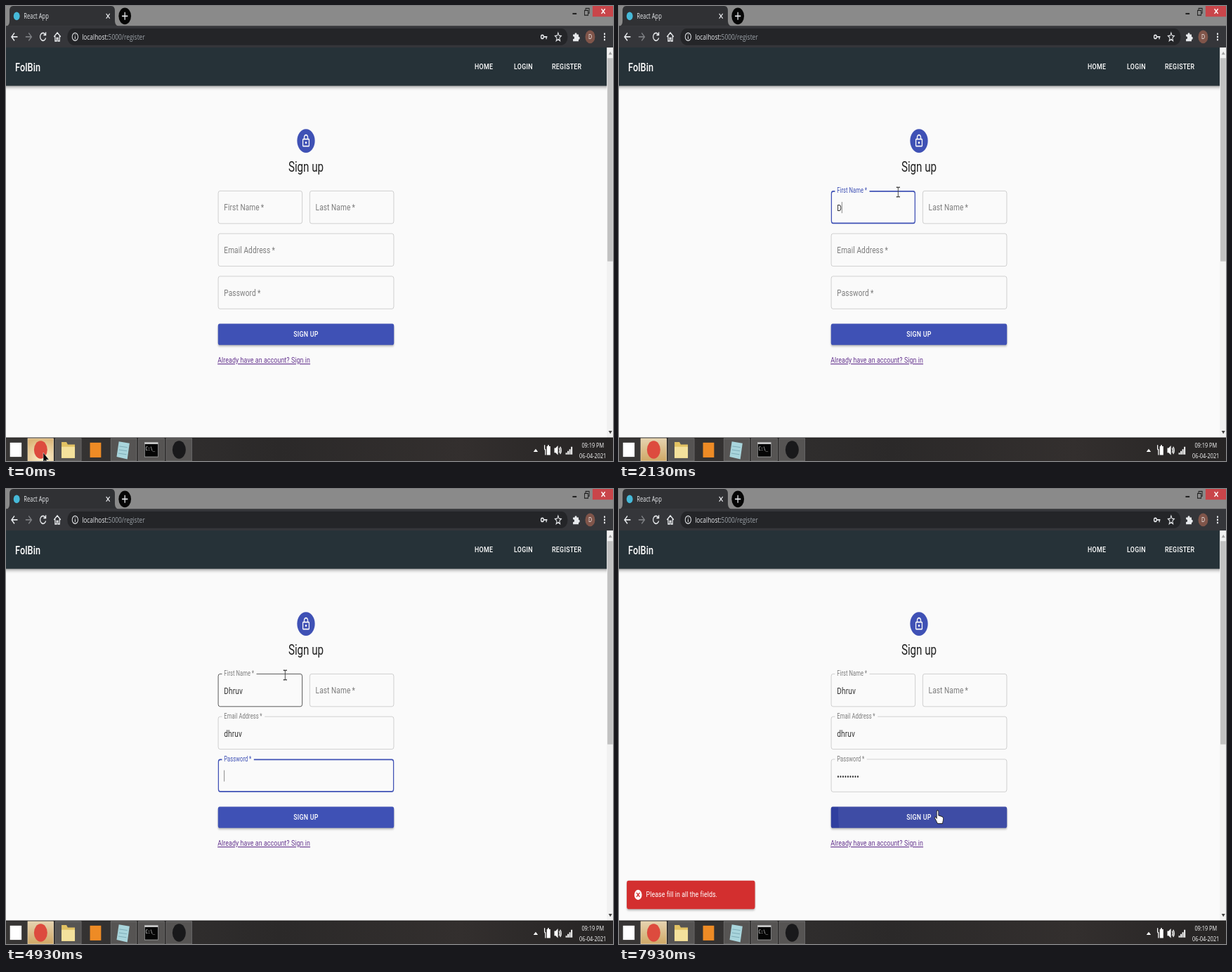
Write an HTML page that moves like this. It is 864x648 px and loops after 8000 ms.

```html
<!DOCTYPE html>
<html lang="en">
<head>
<meta charset="utf-8">
<title>Sign up</title>
<style>
  html, body { margin: 0; width: 100%; height: 100%; overflow: hidden; background: #fafafa; }
  svg { display: block; width: 864px; height: 648px; }
  text { font: 400 14px Roboto, sans-serif; white-space: pre; }
  .ui { font-family: "Open Sans", sans-serif; }
  .medium { font-weight: 500; letter-spacing: .4px; fill: #fff; }
  .value { font-size: 16px; letter-spacing: .15px; fill: rgba(0,0,0,.8); }
  .label { font-size: 16px; letter-spacing: .15px; }
  .line { fill: none; stroke: #e8eaed; stroke-width: 2; }
  .nav { filter: drop-shadow(0 2px 3px rgba(0,0,0,.42)); }
  .raised { filter: drop-shadow(0 2px 2px rgba(0,0,0,.3)); }
</style>
</head>
<body>
<!-- A 1366 x 768 desktop squeezed into a 4:3 stage -->
<svg viewBox="0 0 1366 768" preserveAspectRatio="none">
  <defs>
    <linearGradient id="bar" x2="1" y2="0">
      <stop stop-color="#383635"/><stop offset=".45" stop-color="#2b2929"/>
      <stop offset=".75" stop-color="#332f2e"/><stop offset="1" stop-color="#262424"/>
    </linearGradient>
    <linearGradient id="active" x2="0" y2="1">
      <stop stop-color="#e6d3b0"/><stop offset="1" stop-color="#cfa866"/>
    </linearGradient>
    <radialGradient id="glow" cx=".6" cy=".9" r=".9">
      <stop stop-color="#fff3d0"/><stop offset="1" stop-color="#dcb679"/>
    </radialGradient>
    <clipPath id="buttonClip"><rect x="476.5" y="535.5" width="396" height="36" rx="4"/></clipPath>
  </defs>

  <rect width="1366" height="768" fill="#fafafa"/>

  <!-- page -->
  <g transform="translate(.6 .7)">
    <rect class="nav" x="-10" y="69" width="1372" height="65" fill="#263238"/>
    <text class="medium" x="20" y="109.5" style="font-size:20px;letter-spacing:.15px">FolBin</text>
    <text class="medium" x="1054" y="106.5">HOME</text>
    <text class="medium" x="1142.5" y="106.5">LOGIN</text>
    <text class="medium" x="1228" y="106.5">REGISTER</text>

    <circle cx="674.5" cy="227" r="20" fill="#3f51b5"/>
    <g transform="translate(662.5 215)" fill="none" stroke="#fafafa" stroke-width="2">
      <rect x="5" y="9" width="14" height="12" rx="1"/>
      <path d="M8 9V6a4 4 0 0 1 8 0V9"/>
      <circle cx="12" cy="15" r="2" fill="#fafafa" stroke="none"/>
    </g>
    <text x="674.5" y="279.5" text-anchor="middle" style="font-size:24px" fill="#212121">Sign up</text>

    <g id="fields"></g>

    <rect id="button" class="raised" x="476.5" y="535.5" width="396" height="36" rx="4"/>
    <circle id="ripple" fill="#fff" clip-path="url(#buttonClip)"/>
    <text class="medium" x="674.5" y="558" text-anchor="middle">SIGN UP</text>
    <text x="475.5" y="601.5" fill="#65358f" letter-spacing=".15" text-decoration="underline">Already have an account? Sign in</text>
  </g>

  <g id="toast">
    <rect class="raised" x="17.5" y="661" width="288.5" height="48" rx="4" fill="#d32f2f"/>
    <circle cx="43" cy="685" r="8.5" fill="#fff"/>
    <path d="M39.5 681.5l7 7m0-7l-7 7" stroke="#d32f2f" stroke-width="2"/>
    <text x="61" y="689" fill="#fff" letter-spacing=".1">Please fill in all the fields.</text>
  </g>

  <!-- scrollbar -->
  <rect x="1352" y="70" width="14" height="659" fill="#f1f1f1"/>
  <rect x="1353.5" y="88" width="12" height="343" fill="#c1c1c1"/>
  <path d="M1356 82l4-5 4 5z" fill="#a0a0a0"/>
  <path d="M1356 717l4 5 4-5z" fill="#404040"/>

  <!-- browser frame -->
  <rect width="1366" height="35" fill="#8a8a8a"/>
  <path d="M0 34C6 34 8 30 8 24V8Q8 0 16 0H237Q245 0 245 8V24C245 30 248 34 254 34z" fill="#303134"/>
  <rect y="33.5" width="1366" height="36.5" fill="#35363a"/>
  <circle cx="24" cy="17" r="7" fill="#46b9d8"/>
  <text class="ui" x="40" y="21" style="font-size:12px" fill="#e8eaed">React App</text>
  <path class="line" d="M225.5 13l8 8m0-8l-8 8" style="stroke-width:1.7"/>
  <circle cx="267.5" cy="17" r="14" fill="#060606"/>
  <path class="line" d="M261 17h13m-6.5-6.5v13"/>
  <path d="M1275 13h9" stroke="#222" stroke-width="2.5"/>
  <path d="M1302 7.5h8v8h-8zM1304.5 7v-3h8v8h-3" fill="none" stroke="#222" stroke-width="1.5"/>
  <rect x="1320" width="46" height="18" fill="#c9454a"/>
  <path d="M1340 5l8 8m0-8l-8 8" stroke="#fff" stroke-width="2"/>

  <rect x="138" y="38" width="1126" height="28" rx="14" fill="#242528"/>
  <path class="line" d="M26 52H13m6-6.5l-6.5 6.5 6.5 6.5"/>
  <path class="line" d="M44 52h13m-6-6.5l6.5 6.5-6.5 6.5" style="stroke:#7d7f83"/>
  <path class="line" d="M88.5 48a6.5 6.5 0 1 0 1 6M89.5 44v5h-5"/>
  <path class="line" d="M108 52l7.5-7 7.5 7M110.5 51v8h3.5v-5h3v5h3.5v-8"/>
  <circle class="line" cx="155.5" cy="52" r="6.5" style="stroke-width:1.5"/>
  <path class="line" d="M155.5 51v5m0-8v1.5" style="stroke-width:1.5"/>
  <text class="ui" x="171" y="56.5" style="font-size:13.3px" fill="#e8eaed">localhost:<tspan fill="#9aa0a6">5000/register</tspan></text>
  <circle class="line" cx="1207" cy="52" r="3"/><path class="line" d="M1210 52h8m-2 0v4"/>
  <path class="line" d="M1242.5 45l2 5 5 .4-4 3.5 1.3 5-4.3-3-4.3 3 1.3-5-4-3.5 5-.4z" style="stroke-width:1.5"/>
  <path d="M1276 48h4a2.3 2.3 0 1 1 4.5 0h4v4a2.3 2.3 0 1 1 0 4.5v3h-12.5v-4a2.2 2.2 0 1 0 0-4z" fill="#e8eaed"/>
  <circle cx="1314.5" cy="52" r="11" fill="#80554a"/>
  <text class="ui" x="1314.5" y="56" text-anchor="middle" style="font-size:11px" fill="#fff">D</text>
  <path d="M1347 45.5v13" stroke="#e8eaed" stroke-width="3" stroke-dasharray="3 2"/>

  <!-- taskbar -->
  <rect y="728.5" width="1366" height="39.5" fill="url(#bar)"/>
  <path d="M0 729h1366" stroke="#191818"/>
  <rect x="9" y="737" width="26" height="24" fill="#fff"/>
  <g id="tasks"></g>
  <circle cx="78" cy="749" r="15" fill="#dd4b3e"/>
  <path d="M125 736h11l3 4h16v23h-30z" fill="#e2c263"/><path d="M125 744h30v19h-30z" fill="#f4e19c"/>
  <rect x="189" y="737" width="25" height="25" fill="#ee8b25"/>
  <path d="M254 735l24 3-5 27-24-4z" fill="#a9d5dc"/><path d="M255 743l18 2m-19 4l18 2m-19 4l18 2" stroke="#6d9daa"/>
  <rect x="312" y="737" width="30" height="24" fill="#050505" stroke="#aaa"/>
  <path d="M312 738h30" stroke="#ccc" stroke-width="3"/>
  <text x="314" y="750" fill="#fff" style="font:9px 'DejaVu Sans Mono',monospace">C:\_</text>
  <circle cx="389.5" cy="749" r="15" fill="#19191b"/>
  <path d="M1187 752.5l5-5 5 5z" fill="#fff"/>
  <path d="M1217 743h2v-2h3v2h3v15h-8zM1234 746h3l5-4v16l-5-4h-3z" fill="#fff"/>
  <g fill="none" stroke="#fff" stroke-width="2">
    <path d="M1212 741v6q0 2 2 2v9M1245 746q3 4 0 8m2-10q5 6 0 12"/>
    <path d="M1261 757v-3m4 3v-6m4 6v-9m4 9v-13" stroke-width="3"/>
  </g>
  <g fill="#fff" text-anchor="middle">
    <text class="ui" x="1320.5" y="746" style="font-size:11.6px">09:19 PM</text>
    <text class="ui" x="1320.5" y="763" style="font-size:11.6px">06-04-2021</text>
  </g>

  <g id="cursor">
    <path id="arrow" d="M0 0v17l4-4 3 7 3-1-3-7h6z" fill="#0a0a0a" stroke="#eee" stroke-width=".7"/>
    <path id="beam" d="M-4-8h3l1 1 1-1h3M0-7V7M-4 8h3l1-1 1 1h3" fill="none" stroke="#444" stroke-width="1.5"/>
    <path id="hand" d="M-2 1q2-3 4 0v7l8 2q3 1 3 4l-2 8H0l-6-9q-1-3 2-2l2 2z" fill="#fff" stroke="#222" stroke-width="1.3"/>
  </g>
</svg>

<script>
const LOOP = 8000, STEP = 1000 / 15;
const SX = 864 / 1366, SY = 648 / 768;
const BLUE = "#3f51b5", GREY = "rgba(0,0,0,.5)";
const CLICK = 7556, TOAST = 7700;

const $ = id => document.getElementById(id);
const set = (el, attrs) => { for (const k in attrs) el.setAttribute(k, attrs[k]); return el; };
const add = (parent, tag, attrs) =>
  parent.appendChild(set(document.createElementNS("http://www.w3.org/2000/svg", tag), attrs));
const clamp = v => Math.min(1, Math.max(0, v));
const mix = (a, b, p) => a + (b - a) * p;

// cubic-bezier(x1, 0, x2, 1)
function ease(p, x1, x2) {
  p = clamp(p);
  let lo = 0, hi = 1;
  for (let i = 0; i < 24; i++) {
    const s = (lo + hi) / 2, r = 1 - s;
    if (3 * r * r * s * x1 + 3 * r * s * s * x2 + s * s * s < p) lo = s; else hi = s;
  }
  return lo * lo * (3 - 2 * lo);
}
const easeOut = p => ease(p, 0, .2);
const easeInOut = p => ease(p, .4, .2);

// focus and blur times, and one time for each typed character
const fields = [
  { x: 476.5, y: 311, w: 190, name: "First Name", text: "Dhruv", focus: 1130, blur: 2933, keys: [2067, 2267, 2467, 2600, 2733] },
  { x: 682.5, y: 311, w: 190, name: "Last Name", text: "", focus: 2933, blur: 3600, keys: [] },
  { x: 476.5, y: 383, w: 396, name: "Email Address", text: "dhruv", focus: 3600, blur: 4600, keys: [3867, 4000, 4133, 4267, 4400] },
  { x: 476.5, y: 455, w: 396, name: "Password", text: "•".repeat(9), focus: 4600, blur: CLICK,
    keys: [5130, 5260, 5390, 5500, 5590, 5930, 6100, 6260, 6400] }
];

// time, x, y on the stage
const mouse = [[0, 53, 636], [70, 53, 636], [930, 328.7, 301.5], [1200, 328.7, 301.5],
  [1670, 397.3, 265], [6870, 397.3, 265], [7470, 453.5, 458], [LOOP, 453.5, 458]];

for (const f of fields) {
  const g = $("fields");
  f.border = add(g, "path", { fill: "none" });
  f.label = add(g, "text", { class: "label" });
  f.label.textContent = f.name + "\u2009*";
  f.value = add(g, "text", { class: "value", x: f.x + 13.5, y: f.y + 34.5 });
  f.caret = add(g, "path", { stroke: "#666" });
}
const tasks = [0, 1, 3, 4, 5].map(i => add($("tasks"), "rect", {
  x: 49 + 62.3 * i, y: 730, width: 58, height: 38,
  fill: i ? "#565453" : "url(#active)", stroke: i ? "#777" : "#f0dfbd"
}));

function mouseAt(t) {
  const i = Math.max(1, mouse.findIndex(m => m[0] > t));
  const [t0, x0, y0] = mouse[i - 1], [t1, x1, y1] = mouse[i];
  const p = ease((t - t0) / (t1 - t0), .4, .6);
  return { x: mix(x0, x1, p) / SX, y: mix(y0, y1, p) / SY };
}
const inside = (m, x, y, w, h) => m.x >= x && m.x <= x + w && m.y >= y && m.y <= y + h;

function outline(f, inset, open) {
  const l = f.x + inset, r = f.x + f.w - inset, top = f.y + inset, b = f.y + 56 - inset;
  const from = f.x + 9;
  const to = open ? f.x + 19 + f.label.getComputedTextLength() * .75 : from;
  return `M${to} ${top}H${r - 4}q4 0 4 4V${b - 4}q0 4 -4 4H${l + 4}q-4 0 -4 -4V${top + 4}q0 -4 4 -4H${from}`;
}

function drawField(f, t, hover) {
  const focused = t >= f.focus && t < f.blur;
  const typed = f.keys.filter(k => k <= t);
  const returns = !f.text && t >= f.blur;
  const up = easeOut((t - f.focus) / 200) * (returns ? 1 - easeOut((t - f.blur) / 200) : 1);
  const open = t >= f.focus + 55 && !(returns && t >= f.blur + 40);
  const width = focused ? 2 : 1;

  const scale = mix(1, .75, up);
  const y = f.y + mix(20, -6, up) + 13.5 * scale;
  set(f.label, { transform: `translate(${f.x + 13.5} ${y}) scale(${scale})`, fill: focused ? BLUE : GREY });
  set(f.border, {
    d: outline(f, width / 2, open), "stroke-width": width,
    stroke: focused ? BLUE : hover ? "rgba(0,0,0,.87)" : "rgba(0,0,0,.23)"
  });
  f.value.textContent = f.text.slice(0, typed.length);

  const since = t - Math.max(f.focus, ...typed);
  const cx = f.x + 14 + (typed.length ? f.value.getComputedTextLength() : 0);
  set(f.caret, { d: `M${cx} ${f.y + 19}v19`, opacity: focused && since % 1000 < 500 ? 1 : 0 });
}

function render(t) {
  const m = mouseAt(t);
  let kind = "arrow";
  for (const f of fields) {
    const hover = inside(m, f.x, f.y, f.w, 56);
    if (hover) kind = "beam";
    drawField(f, t, hover);
  }
  const onButton = inside(m, 476.5, 535.5, 396, 36);
  if (onButton) kind = "hand";
  set($("button"), { fill: onButton ? "#303f9f" : BLUE });

  const age = t - CLICK;
  set($("ripple"), {
    cx: 717, cy: 543, r: age > 0 ? 241 * easeInOut(age / 550) : 0,
    opacity: .3 * (1 - easeInOut((age - 100) / 550))
  });
  set($("toast"), {
    transform: `translate(${-320 * (1 - easeOut((t - TOAST) / 225))} 0)`,
    visibility: t >= TOAST ? "visible" : "hidden"
  });

  set(tasks[0], { fill: inside(m, 49, 729, 58, 39) ? "url(#glow)" : "url(#active)" });
  set($("cursor"), { transform: `translate(${m.x} ${m.y})` });
  for (const id of ["arrow", "beam", "hand"]) set($(id), { visibility: id === kind ? "visible" : "hidden" });
}

const start = performance.now();
function tick() {
  const t = Math.max(0, performance.now() - start) % LOOP;
  render(Math.floor((t + 5) / STEP) * STEP % LOOP);
  requestAnimationFrame(tick);
}
tick();
</script>
</body>
</html>
```
